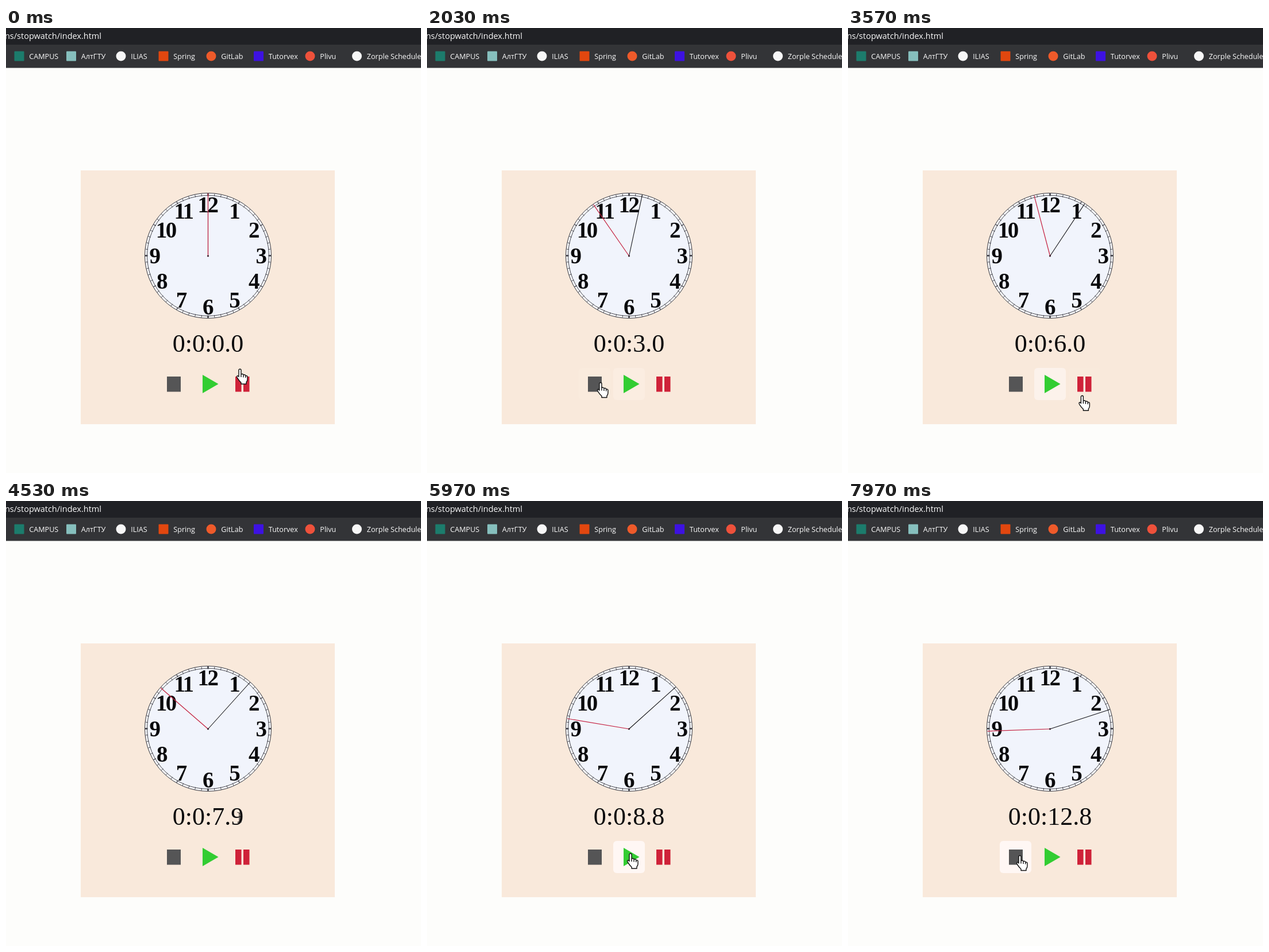
These frames come from a looping animation (722 px wide and 775 px high, 8000 ms). An HTML page:

```html
<!DOCTYPE html>
<html lang="en">
<head>
<meta charset="utf-8">
<title>Stopwatch</title>
<style>
  html, body { margin: 0; width: 100%; height: 100%; overflow: hidden; background: #fdfdfb; }
  svg { display: block; width: 722px; height: 775px; }
  .ui { font-family: "Open Sans", "Noto Sans", sans-serif; fill: #fafafa; }
  .bookmarks { font-size: 12.6px; }
  .numerals { font: bold 39px "Liberation Serif", serif; letter-spacing: -2.5px; text-anchor: middle; }
  .readout { font: 44px "Liberation Serif", serif; text-anchor: middle; }
</style>
</head>
<body>
<svg viewBox="0 0 722 775">
  <rect width="722" height="775" fill="#fdfdfb"/>
  <rect width="722" height="29" fill="#202125"/>
  <rect y="29" width="722" height="40.5" fill="#333437"/>
  <text class="ui" x="166" y="19" font-size="14.5" text-anchor="end">ns/stopwatch/index.html</text>
  <g id="bookmarks" class="ui bookmarks"></g>

  <rect x="130" y="248" width="442" height="442" fill="#f9e9db"/>
  <g transform="translate(351.5 396.5)">
    <ellipse rx="110" ry="109" fill="#f9fafc" stroke="#34343c"/>
    <ellipse rx="106" ry="105" fill="#f1f4fc" stroke="#45454e"/>
    <g id="ticks" stroke="#34343c"></g>
  </g>
  <g id="numerals" class="numerals" fill="#0b0b0d"></g>
  <g transform="translate(351.5 397)">
    <path id="second" d="M0 0V-109" stroke="#17171b" stroke-width="1.1"/>
    <path id="fraction" d="M0 0V-109" stroke="#c41f3e" stroke-width="1.2"/>
    <circle r="1.6" fill="#39202a"/>
  </g>
  <text id="readout" class="readout" x="351.5" y="564.3" fill="#0b0b0d">0:0:0.0</text>

  <g id="glows" fill="#fff7f4"></g>
  <rect x="280" y="607" width="24" height="26.5" fill="#555556"/>
  <path d="M342 604L369.5 620L342 636Z" fill="#32cd32"/>
  <path d="M399 607h10.5v26.5h-10.5zM413 607h10.5v26.5h-10.5z" fill="#cf2239"/>

  <g id="cursor" stroke-linejoin="round">
    <path id="hand" fill="#fff" stroke="#111" stroke-width="1.4"
      d="M-2 2a2 2 0 0 1 4 0V9q3-1.5 4 1q3-1 3.8 1.4q3.2-.4 3.2 2.6v4q0 3-2 5v3h-9v-2.5q-3-2.5-6.5-8q-1.8-3 .2-3.8q1.3-.2 2.3 1.8zM2 9v5M6 10v4.5M9.8 11.4v3.6"/>
    <path id="beam" fill="none" stroke="#222" stroke-width="1.2"
      d="M-3.5-8.5q3 0 3.5 1.5q.5-1.5 3.5-1.5M0-7V7M-3.5 8.5q3 0 3.5-1.5q.5 1.5 3.5 1.5"/>
    <path id="arrow" fill="#fff" stroke="#151515" d="M0 0V17l4-3.7l2.6 6l2.6-1.2l-2.6-5.8h5.4z"/>
  </g>
</svg>
<script>
const LOOP = 8000, FADE = 200, SAMPLES = 20;
const RATE = 1.984, STARTED = 517, PAUSED = 4860, RESUMED = 5840;
const $ = id => document.getElementById(id);
const clamp = p => Math.min(1, Math.max(0, p));
const smooth = p => p * p * (3 - 2 * p);

function add(parent, tag, attrs, text = "") {
  const el = document.createElementNS("http://www.w3.org/2000/svg", tag);
  for (const key in attrs) el.setAttribute(key, attrs[key]);
  el.textContent = text;
  return parent.appendChild(el);
}

function addBookmark(label, x, fill, shape) {
  const rx = { square: 1, circle: 8.5 }[shape];
  add($("bookmarks"), "rect", { x: x - 8.5, y: 40.5, width: 17, height: 17, rx, fill });
  add($("bookmarks"), "text", { x: x + 17.3, y: 53.5 }, label);
}
addBookmark("CAMPUS", 23, "#1c7c6c", "square");
addBookmark("АлтГТУ", 113.5, "#86bfbd", "square");
addBookmark("ILIAS", 200, "#f7f7f7", "circle");
addBookmark("Spring", 274, "#e2470f", "square");
addBookmark("GitLab", 357, "#ee5a2a", "circle");
addBookmark("Tutorvex", 439.5, "#3d12e2", "square");
addBookmark("Plivu", 529, "#ee513b", "circle");
addBookmark("Zorple Schedule", 610.5, "#f7f7f7", "circle");

for (let i = 0; i < 60; i++) {
  add($("ticks"), "path", {
    d: "M0-105V-109.5",
    transform: `scale(1 .991) rotate(${i * 6})`,
    "stroke-width": i % 15 ? (i % 5 ? 0.8 : 1.4) : 2.4
  });
}

// Two-digit numerals sit further in, so that they clear the rim.
for (let n = 1; n <= 12; n++) {
  const angle = n * Math.PI / 6, reach = n > 9 ? 84 : 92.5;
  add($("numerals"), "text", {
    x: 350.5 + reach * Math.sin(angle),
    y: 409.5 - 89 * Math.cos(angle)
  }, n);
}

const buttons = [264, 324, 384].map(x => ({
  x, glow: add($("glows"), "rect", { x, y: 592, width: 55, height: 56, rx: 6 })
}));

const entry = [407, 594], stop = [299, 617.5], play = [362, 621], pause = [410, 620];
const moves = [
  { from: 60, to: 380, spot: play },
  { from: 1150, to: 1400, spot: pause },
  { from: 1760, to: 2060, spot: stop },
  { from: 2650, to: 2950, spot: play },
  { from: 3500, to: 3580, spot: [409, 641] },
  { from: 4100, to: 4530, spot: [406, 551] },
  { from: 4600, to: 4800, spot: pause },
  { from: 5520, to: 5760, spot: [354, 614] },
  { from: 7250, to: 7560, spot: stop }
];

function cursorAt(t) {
  return moves.reduce((at, { from, to, spot }) => {
    const p = smooth(clamp((t - from) / (to - from)));
    return at.map((v, i) => v + (spot[i] - v) * p);
  }, entry);
}

const isOver = (button, [x, y]) => x >= button.x && x <= button.x + 55 && y >= 592 && y <= 648;

// The glow follows the share of the last FADE ms spent over the button.
function glowAt(button, t) {
  let hits = 0;
  for (let i = 0; i < SAMPLES; i++) {
    const past = t - i * FADE / SAMPLES;
    if (past >= 0 && isOver(button, cursorAt(past))) hits++;
  }
  return (hits / SAMPLES) ** 2;
}

function elapsedAt(t) {
  const running = Math.min(t, PAUSED) - STARTED + Math.max(0, t - RESUMED);
  return Math.max(0, running * RATE / 1000);
}

// Both hands trail the readout by a tenth of a second.
function drawClock(t) {
  const elapsed = elapsedAt(t);
  const tenths = Math.floor(elapsed * 10);
  const whole = Math.floor(tenths / 10);
  const seconds = Math.max(0, whole - 1 + clamp((elapsed - whole) * 10));
  $("readout").textContent = `0:0:${whole}.${tenths % 10}`;
  $("second").setAttribute("transform", `rotate(${seconds * 6})`);
  $("fraction").setAttribute("transform", `rotate(${Math.max(0, elapsed - 0.1) * 360})`);
}

function drawCursor(t) {
  const [x, y] = cursorAt(t);
  const overText = y > 528 && y < 576 && x > 288 && x < 415;
  const kind = buttons.some(b => isOver(b, [x, y])) ? "hand" : overText ? "beam" : "arrow";
  for (const id of ["hand", "beam", "arrow"]) $(id).style.display = id === kind ? "" : "none";
  $("cursor").setAttribute("transform", `translate(${x} ${y})`);
}

const start = performance.now();
function render() {
  const t = (performance.now() - start) % LOOP;
  drawClock(t);
  drawCursor(t);
  for (const b of buttons) b.glow.setAttribute("opacity", glowAt(b, t));
  requestAnimationFrame(render);
}
render();
</script>
</body>
</html>
```
